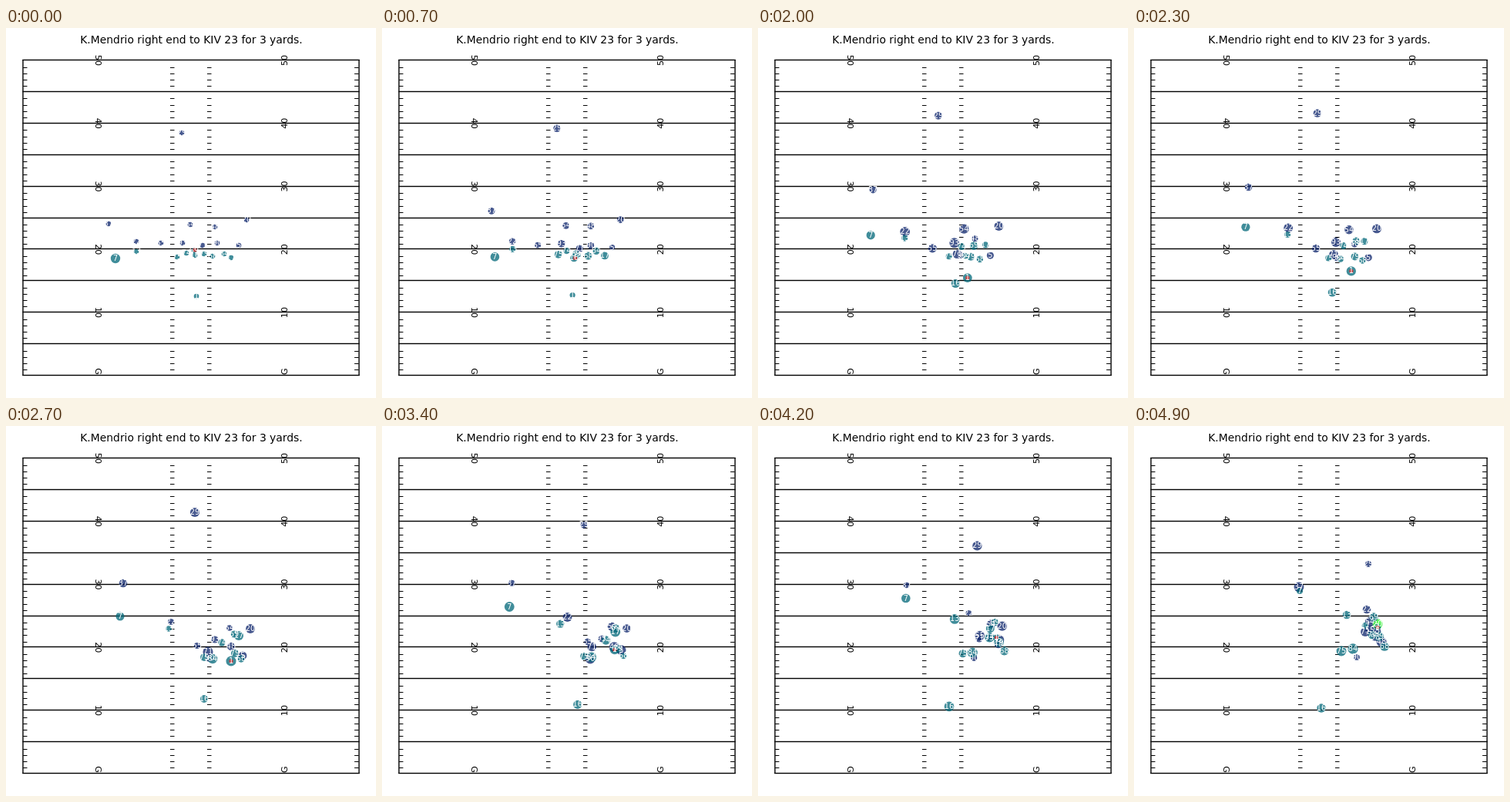
Write an HTML page with a canvas that moves like this. It is 480 px wide and 480 px high and loops after 5 s.

```html
<!DOCTYPE html>
<html>
<head>
<meta charset="utf-8">
<style>
html, body { margin: 0; width: 100%; height: 100%; overflow: hidden; background: #fff; }
canvas { display: block; }
</style>
</head>
<body>
<canvas id="c" width="480" height="480"></canvas>
<script>
const ctx = document.getElementById('c').getContext('2d');
const FONT = '"DejaVu Sans", sans-serif';
const NAVY = 'rgba(9,33,105,.75)', TEAL = 'rgba(0,103,120,.75)';
const RED = 'rgba(225,50,50,.8)', GREEN = 'rgba(50,240,50,.8)';
const LOOP = 5000, STEP = 100, SNAP = 1300, HANDOFF = 2000, TACKLE = 4800;
const YARD = 8.18;
const times = [0, SNAP, 2700, 4900];
const players = [];

// A run passes through four points: line-up, just after the snap, mid-play, end
function add(label, color, path, r0 = 3.3) {
  const p = { label, color, r0, seed: players.length + 1, x: path.map(q => q[0]), y: path.map(q => q[1]) };
  players.push(p);
  return p;
}

add('29', NAVY, [[228, 136], [228, 124], [245, 112], [304, 179]]);
add('37', NAVY, [[133, 254], [150, 221], [152, 204], [214, 209]]);
add('22', NAVY, [[169, 277], [174, 274], [214, 254], [302, 238]]);
add('55', NAVY, [[201, 279], [208, 284], [248, 285], [306, 265]]);
add('93', NAVY, [[229, 279], [240, 280], [271, 277], [313, 274]]);
add('71', NAVY, [[255, 282], [258, 290], [262, 293], [300, 267]]);
add('90', NAVY, [[274, 279], [268, 287], [264, 301], [289, 300]]);
add('54', NAVY, [[239, 255], [244, 258], [290, 262], [306, 254]]);
add('48', NAVY, [[271, 258], [273, 259], [292, 286], [321, 280]]);
add('5', NAVY, [[302, 282], [297, 288], [307, 298], [316, 266]]);
const tackler = add('20', NAVY, [[312, 249], [308, 250], [317, 263], [316, 257]]);

add('7', TEAL, [[142, 299], [150, 290], [148, 247], [215, 214]], 6.2);
add('13', TEAL, [[169, 290], [174, 282], [211, 263], [276, 245]]);
add('75', TEAL, [[222, 297], [237, 292], [257, 300], [269, 292]]);
add('74', TEAL, [[234, 292], [248, 286], [280, 281], [309, 271]]);
add('69', TEAL, [[244, 289], [262, 293], [296, 270], [311, 248]]);
add('79', TEAL, [[257, 293], [256, 296], [297, 295], [318, 273]]);
add('68', TEAL, [[268, 296], [271, 296], [305, 302], [325, 286]]);
add('84', TEAL, [[283, 293], [273, 288], [268, 302], [284, 289]]);
add('17', TEAL, [[292, 298], [288, 291], [302, 272], [300, 259]]);
const passer = add('16', TEAL, [[245, 295], [253, 307], [257, 354], [243, 366]]);
const runner = add('1', TEAL, [[247, 348], [252, 341], [292, 305], [316, 261]]);

const mix = (a, b, u) => a + (b - a) * u;
const clamp = u => Math.min(1, Math.max(0, u));

function slope(v, i) {
  const a = Math.max(i - 1, 0), b = Math.min(i + 1, v.length - 1);
  return (v[b] - v[a]) / (times[b] - times[a]) * (i ? 1 : .4);
}

function at(v, t) {
  let i = 0;
  while (i < times.length - 2 && t >= times[i + 1]) i++;
  const d = times[i + 1] - times[i], u = (t - times[i]) / d, w = 1 - u;
  return v[i] * (1 + 2 * u) * w * w + v[i + 1] * u * u * (3 - 2 * u)
    + d * u * w * (slope(v, i) * w - slope(v, i + 1) * u);
}

function random(seed, k) {
  const n = Math.sin(seed * 12.9898 + k * 78.233) * 43758.5453;
  return n - Math.floor(n);
}

// Small at line-up, then a smooth random pulse
function radius(p, t) {
  const k = Math.floor(t / 700), u = t / 700 - k;
  const pulse = mix(random(p.seed, k), random(p.seed, k + 1), u * u * (3 - 2 * u));
  return mix(p.r0, 3.7 + 3 * pulse, clamp(t / SNAP));
}

function write(str, x, y, size, angle = 0, color = '#000') {
  ctx.save();
  ctx.translate(x, y);
  ctx.rotate(angle);
  ctx.font = `${size}px ${FONT}`;
  ctx.textAlign = 'center';
  ctx.fillStyle = color;
  ctx.fillText(str, 0, size * (angle ? .365 : .31));
  ctx.restore();
}

function disc(x, y, r, color) {
  ctx.fillStyle = color;
  ctx.beginPath();
  ctx.arc(x, y, r, 0, 7);
  ctx.fill();
}

function field() {
  ctx.fillStyle = '#fff';
  ctx.fillRect(0, 0, 480, 480);
  ctx.fillStyle = '#000';
  for (let yard = 0; yard <= 50; yard++) {
    if (yard % 5 === 0) ctx.fillRect(21.5, Math.round(450 - yard * YARD) - .2, 437, 1.4);
    else for (const x of [22, 213, 261, 452]) ctx.fillRect(x, Math.floor(451.9 - yard * YARD), 5.5, 1);
  }
  for (const x of [21.3, 457.3]) ctx.fillRect(x, 41, 1.4, 410);
  for (let yard = 0; yard <= 50; yard += 10) {
    const y = yard ? 450.9 - yard * YARD : 445.6;
    write(yard || 'G', 119.8, y, 11.11, Math.PI / 2);
    write(yard || 'G', 361.3, y, 11.11, -Math.PI / 2);
  }
  write('K.Mendrio right end to KIV 23 for 3 yards.', 240.5, 15.7, 13.89);
}

function draw(now) {
  const t = Math.floor(now % LOOP / STEP) * STEP;
  field();
  for (const p of players) {
    p.px = at(p.x, t);
    p.py = at(p.y, t);
    disc(p.px, p.py, radius(p, t), p === tackler && t >= TACKLE ? GREEN : p.color);
  }
  // The ball goes from passer to runner
  const given = clamp((t - SNAP) / (HANDOFF - SNAP)), snapped = clamp(t / SNAP);
  disc(mix(passer.px, runner.px, given) + 3 * snapped * (1 - given),
    mix(passer.py, runner.py, given) + mix(-7, 6, snapped) * (1 - given), 2.6, RED);
  for (const p of players) write(p.label, p.px, p.py, 9.72, 0, '#fff');
}

let start;
function tick(now) {
  start ??= now;
  draw(now - start);
  requestAnimationFrame(tick);
}
draw(0);
requestAnimationFrame(tick);
</script>
</body>
</html>
```
